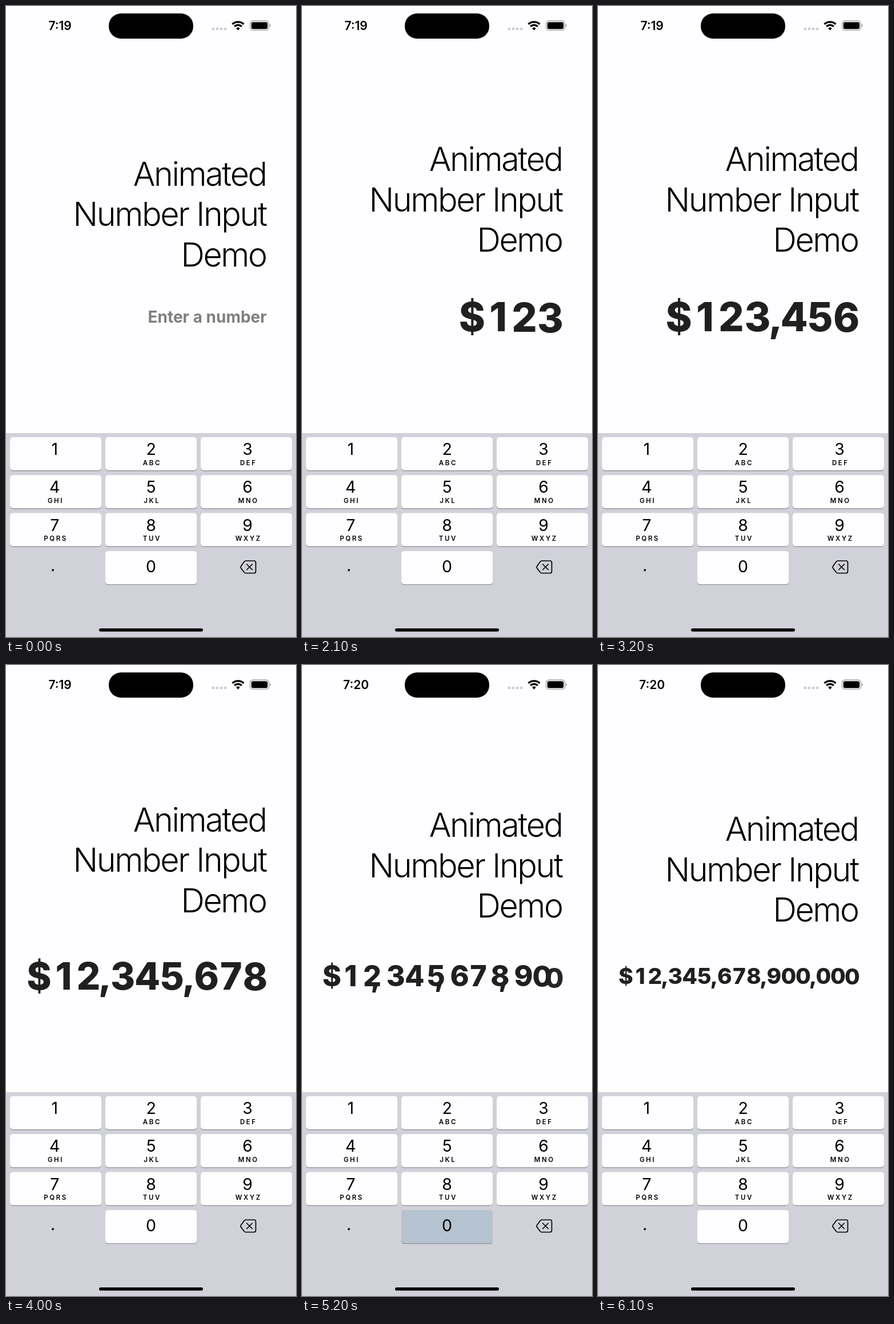
An HTML page that plays this animation: 508 px wide and 1102 px high, repeating every 6500 ms.

```html
<!DOCTYPE html>
<html lang="en">
<head>
<meta charset="utf-8">
<title>Animated Number Input</title>
<style>
  html, body { margin: 0; width: 100%; height: 100%; overflow: hidden; background: #fefdff; }
  svg { display: block; width: 508px; height: 1102px; font-family: Inter, sans-serif; }
  #clock { font-size: 21px; font-weight: 600; text-anchor: middle; }
  #title { font-size: 57.5px; font-weight: 300; letter-spacing: -2.4px; text-anchor: end; }
  #hint { font-size: 28px; font-weight: 700; fill: #7f7f80; text-anchor: end; }
  #number { font-weight: 800; fill: #202021; text-anchor: middle; }
  #keys { text-anchor: middle; font-size: 28.5px; }
  #keys .letters { font-size: 11.5px; font-weight: 600; letter-spacing: 2.6px; }
</style>
</head>
<body>
<svg id="stage" viewBox="0 0 508 1102">
  <text id="clock" x="94.6" y="42"></text>
  <rect x="180" y="13" width="148" height="44" rx="21.5"/>
  <path d="M363 40h.1m6.9 0h.1m6.9 0h.1m6.9 0h.1" stroke="#c9c9cb" stroke-width="4.6" stroke-linecap="round"/>
  <g fill="none" stroke="#000" stroke-width="3.4">
    <path d="M396.5 31.8a14.7 14.7 0 0 1 20 0M400.2 35.8a9.2 9.2 0 0 1 12.6 0"/>
    <path d="M406.5 42.5l-3.4-3.6a5 5 0 0 1 6.8 0z" fill="#000" stroke="none"/>
  </g>
  <rect x="427.5" y="26" width="33" height="16.4" rx="5" fill="none" stroke="#a3a3a5" stroke-width="1.3"/>
  <rect x="429.7" y="28.2" width="28.6" height="12" rx="3.2"/>
  <path d="M462 31.6q2 .8 2 2.7t-2 2.7z" fill="#a9a9ab"/>
  <g id="title">
    <text x="455.8" y="313.5">Animated</text>
    <text x="455.8" y="384">Number Input</text>
    <text x="455.8" y="454.500">Demo</text>
  </g>
  <text id="hint" x="456.7" y="552.5">Enter a number</text>
  <g id="number"></g>
  <rect y="746" width="508" height="356" fill="#d0d1d9"/>
  <g id="keys"></g>
  <path d="M420 969h14.5q3 0 3 3v15.5q0 3-3 3h-14.5q-1.500 0-2.600-1.200l-5.800-7.500q-1.200-1.800 0-3.600l5.800-7.800q1.100-1.400 2.600-1.400zM421.800 975l9.500 9.500m0-9.500l-9.500 9.500"
        fill="none" stroke="#000" stroke-width="1.7" stroke-linecap="round" stroke-linejoin="round"/>
  <rect x="163" y="1087" width="182" height="5.5" rx="2.75"/>
</svg>
<script>
const LOOP = 6500, HOLD = 150, MOVE = 0.018, RISE = 0.009;
const RIGHT = 458, FIT = 422, MAX_SIZE = 70, HINT_SIZE = 28;
const DIGIT = 0.655, COMMA = 0.265;
const digits = '12345678900000';
const times = [1200, 1450, 1720, 2200, 2500, 2800, 3400, 3680, 4250, 4700, 5078, 5400, 5600, 5780];

const $ = id => document.getElementById(id);
function add(parent, tag, attrs, text = '') {
  const el = document.createElementNS('http://www.w3.org/2000/svg', tag);
  for (const name in attrs) el.setAttribute(name, attrs[name]);
  el.textContent = text;
  return parent.appendChild(el);
}

// Keypad
const keyRects = {};
const letters = ['', 'ABC', 'DEF', 'GHI', 'JKL', 'MNO', 'PQRS', 'TUV', 'WXYZ'];
function addKey(label, col, row, sub) {
  const x = 7 + 167 * col, y = 753 + 66.3 * row, cx = 85.7 + 168.9 * col;
  const box = { x, width: 160, height: 58, rx: 5 };
  add($('keys'), 'rect', { ...box, y: y + 1.2, fill: '#898a8e' });
  keyRects[label] = add($('keys'), 'rect', { ...box, y });
  add($('keys'), 'text', { x: cx - 0.5, y: y + (label === '0' ? 37.5 : 31) }, label);
  if (sub) add($('keys'), 'text', { x: cx + 1.3, y: y + 48.5, class: 'letters' }, sub);
}
letters.forEach((sub, i) => addKey(String(i + 1), i % 3, Math.floor(i / 3), sub));
addKey('0', 1, 3);
add($('keys'), 'text', { x: 82, y: 987 }, '.');

// Right-aligned number: font size and the centre of every character
function layout(count) {
  const pos = {};
  let em = 0;
  const put = (id, width) => { pos[id] = em + width / 2; em += width; };
  for (let i = count - 1, right = 0; i >= 0; i--, right++) {
    if (right && right % 3 === 0) put('comma' + right / 3, COMMA);
    put('digit' + i, DIGIT);
  }
  put('$', DIGIT);
  const size = Math.min(MAX_SIZE, FIT / em);
  for (const id in pos) pos[id] = RIGHT - pos[id] * size;
  return { size, pos };
}
const steps = times.map((_, i) => layout(i + 1));
const sizes = steps.map(s => s.size);

const glyphs = Object.keys(steps.at(-1).pos).map(id => {
  const char = id === '$' ? '$' : id.startsWith('comma') ? ',' : digits[id.slice(5)];
  return {
    born: steps.findIndex(s => id in s.pos),
    xs: steps.map(s => s.pos[id]),
    el: add($('number'), 'text', {}, char)
  };
});

function spring(ms, rate = MOVE) {
  const k = Math.max(0, ms) * rate;
  return 1 - (1 + k) * Math.exp(-k);
}
// Springs of successive steps add up
function track(values, first, t) {
  let v = values[first];
  for (let i = first + 1; i < values.length; i++)
    v += (values[i] - values[i - 1]) * spring(t - times[i]);
  return v;
}

function draw(t) {
  const size = track(sizes, 0, t);
  const shown = spring(t - times[0]);
  $('clock').textContent = t < 4400 ? '7:19' : '7:20';
  $('title').setAttribute('transform', `translate(0 ${-0.6 * (size - HINT_SIZE) * shown})`);
  $('hint').setAttribute('opacity', Math.max(0, 1 - 2 * shown));

  for (const { born, xs, el } of glyphs) {
    const age = t - times[born], p = spring(age);
    const scale = size * (0.86 + 0.14 * p);
    const y = 543 + 0.12 * size * (1 - spring(age, RISE)) + 0.362 * scale;
    el.setAttribute('font-size', scale);
    el.setAttribute('transform', `translate(${track(xs, born, t)} ${y})`);
    el.setAttribute('opacity', Math.min(1, 1.5 * p));
  }

  for (const label in keyRects) {
    const down = times.some((start, i) => digits[i] === label && t >= start && t < start + HOLD);
    keyRects[label].setAttribute('fill', down ? '#b5c2d0' : '#fefdff');
  }
}

function tick() {
  draw(performance.now() % LOOP);
  requestAnimationFrame(tick);
}
tick();
</script>
</body>
</html>
```
